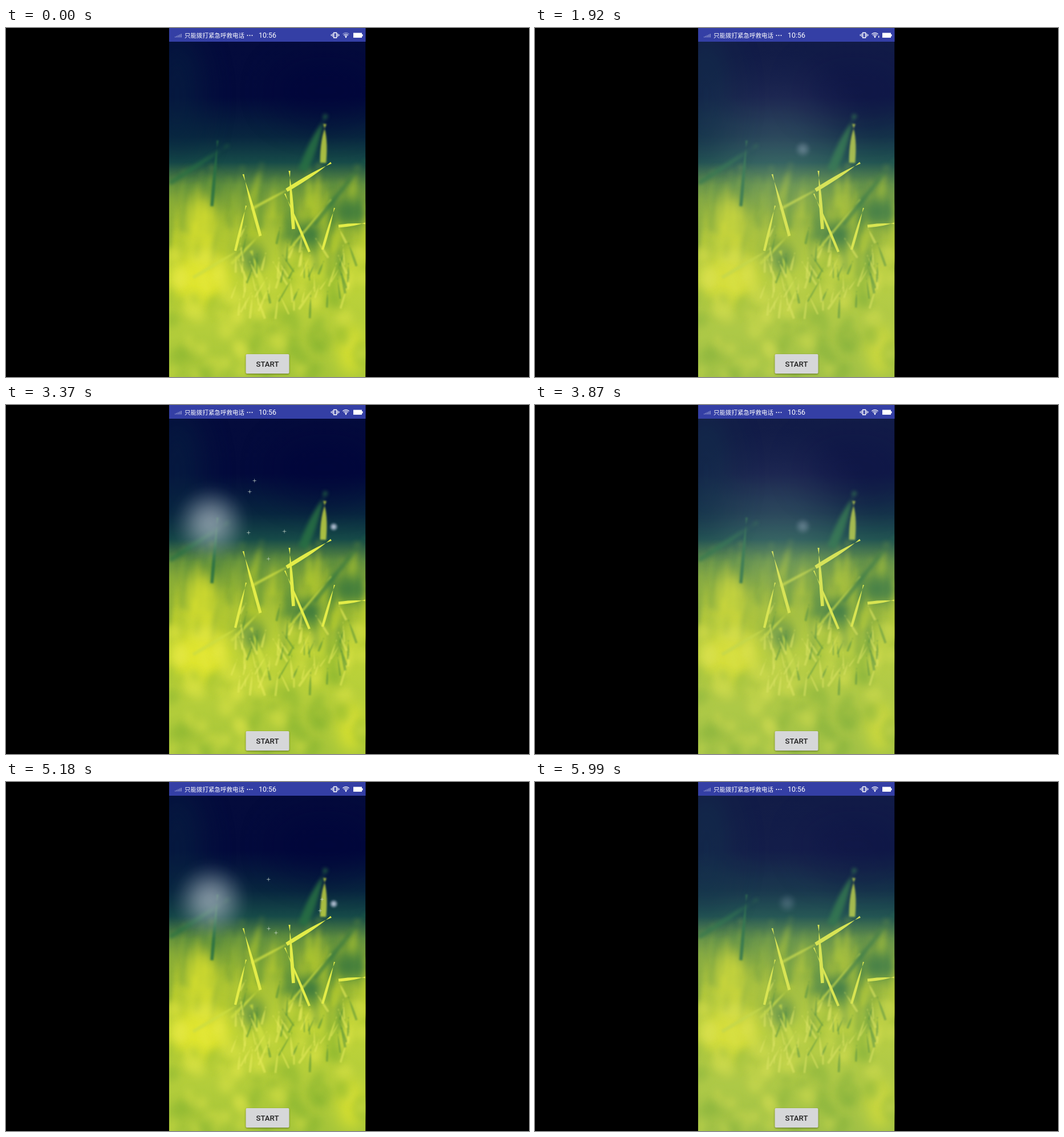
Recreate the animation shown at these times as an HTML page with a canvas. Size 917x611 px, loop 6.02 s.

```html
<!DOCTYPE html>
<html lang="zh">
<head>
<meta charset="utf-8">
<title>Lens flare over grass</title>
<style>
html, body { margin: 0; width: 100%; height: 100%; overflow: hidden; background: #000; }
canvas { display: block; width: 917px; height: 611px; }
</style>
</head>
<body>
<canvas id="stage" width="917" height="611"></canvas>
<script>
const W = 917, H = 611, LOOP = 6020, PLAY = 1430;
const LEFT = 286, RIGHT = 630.5, FLARE_Y = 212, CENTER_X = 458;
const PLAY_STARTS = [830, 2780, 4590];
const stage = document.getElementById('stage').getContext('2d');

const clamp = v => Math.min(1, Math.max(0, v));
const mix = (a, b, k) => a + (b - a) * k;

function seeded(seed) {
  let s = seed;
  const next = () => (s = (s * 16807) % 2147483647) / 2147483647;
  next();
  return (a = 0, b = 1) => mix(a, b, next());
}

function clipToPhone(ctx) {
  ctx.beginPath();
  ctx.rect(LEFT, 0, RIGHT - LEFT, H);
  ctx.clip();
}

// A tapered leaf from its tip (x, y) to its root (rx, ry)
function blade(ctx, color, x, y, rx, ry, width) {
  const length = Math.hypot(rx - x, ry - y);
  const nx = (y - ry) / length * width / 2, ny = (rx - x) / length * width / 2;
  const mx = mix(x, rx, 0.35), my = mix(y, ry, 0.35);
  ctx.fillStyle = color;
  ctx.beginPath();
  ctx.moveTo(x - nx * 0.4, y - ny * 0.4);
  ctx.quadraticCurveTo(mx + nx, my + ny, rx + nx * 0.7, ry + ny * 0.7);
  ctx.lineTo(rx - nx * 0.7, ry - ny * 0.7);
  ctx.quadraticCurveTo(mx - nx, my - ny, x + nx * 0.4, y + ny * 0.4);
  ctx.fill();
}

function blob(ctx, color, x, y, rx, ry = rx, angle = 0) {
  ctx.fillStyle = color;
  ctx.beginPath();
  ctx.ellipse(x, y, rx, ry, angle, 0, 7);
  ctx.fill();
}

function paintBackdrop(ctx) {
  const g = ctx.createLinearGradient(0, 0, 0, H);
  [[24, '#040b3c'], [120, '#030a3c'], [190, '#08263f'], [235, '#164a48'], [275, '#62903f'],
   [330, '#9fbb36'], [430, '#bed338'], [520, '#b5ce3b'], [611, '#a5c53a']]
    .forEach(([y, color]) => g.addColorStop(y / H, color));
  ctx.fillStyle = g;
  ctx.fillRect(LEFT, 0, RIGHT - LEFT, H);
  ctx.filter = 'blur(26px)';
  blob(ctx, 'rgba(8,40,66,.5)', 300, 120, 45, 110);
  blob(ctx, 'rgba(0,2,58,.5)', 560, 110, 95, 60);
}

function paintTufts(ctx, rnd) {
  ctx.filter = 'blur(5px)';
  for (let i = 0; i < 80; i++) {
    const x = rnd(LEFT, RIGHT), top = 232 + 22 * Math.cos(x / 31) ** 2 + rnd(0, 85), light = rnd();
    const color = `rgba(${mix(60, 205, light)},${mix(125, 218, light)},${mix(65, 45, light)},.55)`;
    blade(ctx, color, x, top, x + rnd(-22, 12), top + rnd(60, 120), rnd(9, 19));
  }
}

function paintDepth(ctx) {
  const shade = 'rgba(35,105,65,.75)', sun = 'rgba(233,234,45,.8)';
  ctx.filter = 'blur(11px)';
  blob(ctx, shade, 360, 292, 9, 30);
  blob(ctx, shade, 428, 402, 22, 23);
  blob(ctx, shade, 525, 362, 30, 22);
  blob(ctx, shade, 600, 322, 28, 26);
  ctx.filter = 'blur(15px)';
  blob(ctx, sun, 342, 345, 26, 55);
  blob(ctx, sun, 340, 440, 50, 45);
  blob(ctx, sun, 605, 565, 20, 45);
}

function paintForeground(ctx, rnd) {
  ctx.filter = 'blur(7px)';
  for (let i = 0; i < 85; i++) {
    const y = rnd(390, 615), sunny = rnd() > mix(0.2, 0.65, (y - 390) / 225);
    blob(ctx, sunny ? 'rgba(232,234,75,.38)' : 'rgba(120,172,45,.38)',
      rnd(LEFT, RIGHT), y, rnd(6, 15), rnd(9, 24), rnd(-0.7, 0.7));
  }
}

function paintBlades(ctx, rnd) {
  const dark = 'rgba(40,112,68,.85)', soft = 'rgba(206,222,65,.8)', lit = '#e3ec48';
  ctx.filter = 'blur(3px)';
  blade(ctx, dark, 561, 152, 520, 250, 22);
  blade(ctx, dark, 390, 205, 287, 272, 9);
  blade(ctx, dark, 631, 230, 540, 345, 7);
  ctx.filter = 'blur(1.4px)';
  blade(ctx, dark, 371, 197, 361, 312, 8);
  blade(ctx, soft, 559, 168, 556, 236, 15);
  blade(ctx, soft, 505, 277, 430, 317, 6);
  blade(ctx, soft, 415, 385, 328, 437, 8);
  blade(ctx, soft, 446, 361, 395, 413, 7);
  blade(ctx, soft, 570, 300, 495, 390, 5);
  blade(ctx, soft, 430, 390, 457, 474, 15);

  // Small leaves around the focal plane
  ctx.filter = 'blur(.9px)';
  for (let i = 0; i < 70; i++) {
    const x = rnd(395, 605), y = rnd(345, 475), length = rnd(18, 42), lean = rnd(-0.7, 0.7);
    blade(ctx, i % 3 ? 'rgba(228,234,90,.6)' : 'rgba(75,140,55,.5)',
      x, y, x + length * lean, y + length, rnd(3, 6));
  }
  ctx.filter = 'blur(.6px)';
  blade(ctx, lit, 570, 236, 492, 284, 9);
  blade(ctx, lit, 416, 256, 446, 364, 7);
  blade(ctx, lit, 497, 250, 504, 352, 8);
  blade(ctx, lit, 489, 290, 532, 392, 6);
  blade(ctx, lit, 421, 311, 402, 390, 6);
  blade(ctx, lit, 576, 315, 555, 388, 6);
  blade(ctx, lit, 630, 342, 583, 347, 7);
}

function paintMeadow() {
  const canvas = document.createElement('canvas');
  canvas.width = W;
  canvas.height = H;
  const ctx = canvas.getContext('2d'), rnd = seeded(4211);
  ctx.fillRect(0, 0, W, H);
  clipToPhone(ctx);
  paintBackdrop(ctx);
  paintTufts(ctx, rnd);
  paintDepth(ctx);
  paintForeground(ctx, rnd);
  paintBlades(ctx, rnd);
  return canvas;
}

function drawWifi(ctx, t) {
  ctx.strokeStyle = '#fff';
  ctx.lineWidth = 1.3;
  for (let i = 0; i < 3; i++) {
    ctx.globalAlpha = t < 330 && i === 2 ? 0.45 : 0.95;
    ctx.beginPath();
    ctx.arc(596, 16.5, 2.8 + i * 2.6, -Math.PI * 0.75, -Math.PI * 0.25);
    ctx.stroke();
  }
  ctx.globalAlpha = 1;
  blob(ctx, '#fff', 596, 16, 1.2);
  if (t >= 330 && t < 2260) ctx.fillRect(602, 13.5, 1.3, 3.5);
}

function drawStatusBar(ctx, t) {
  ctx.fillStyle = '#343fa5';
  ctx.fillRect(LEFT, 0, RIGHT - LEFT, 24);
  ctx.fillStyle = 'rgba(255,255,255,.42)';
  for (let i = 0; i < 5; i++) ctx.fillRect(296 + i * 2.6, 15 - i * 1.2, 1.5, 1.5 + i * 1.2);
  ctx.fillStyle = '#fff';
  ctx.font = '10.5px "Noto Sans CJK SC", "Noto Sans CJK", sans-serif';
  ctx.fillText('只能拨打紧急呼救电话', 313, 16.5);
  for (let i = 0; i < 3; i++) blob(ctx, '#fff', 423.5 + i * 4, 13, 1);
  ctx.font = '12.4px Roboto, sans-serif';
  ctx.fillText('10:56', 443, 17.3);

  // Vibrate icon
  ctx.strokeStyle = '#fff';
  ctx.lineWidth = 1.5;
  ctx.strokeRect(574.7, 8.3, 4.8, 8.8);
  for (const side of [-1, 1]) {
    ctx.fillRect(576.5 + side * 4.5, 9.5, 1.2, 6);
    ctx.fillRect(576.5 + side * 6.7, 11, 1.2, 3);
  }
  drawWifi(ctx, t);
  ctx.fillRect(609, 8.5, 15, 8.5);
  ctx.fillRect(624, 11, 1.6, 3.5);
}

function drawButton(ctx) {
  ctx.save();
  ctx.shadowColor = 'rgba(0,0,0,.4)';
  ctx.shadowBlur = 3;
  ctx.shadowOffsetY = 1;
  ctx.fillStyle = '#d6d7d9';
  ctx.beginPath();
  ctx.roundRect(420.5, 571, 76, 34, 2);
  ctx.fill();
  ctx.restore();
  ctx.fillStyle = '#202020';
  ctx.font = '500 13.2px Roboto, sans-serif';
  ctx.textAlign = 'center';
  ctx.fillText('START', 458.5, 593);
  ctx.textAlign = 'left';
}

function glow(ctx, x, y, r, alpha, color) {
  const g = ctx.createRadialGradient(x, y, 0, x, y, r);
  for (let k = 0; k <= 1; k += 0.125) {
    g.addColorStop(k, `rgba(${color},${alpha * (0.5 + 0.5 * Math.cos(Math.PI * k))})`);
  }
  ctx.fillStyle = g;
  ctx.fillRect(x - r, y - r, 2 * r, 2 * r);
}

function drawStar(ctx, x, y, alpha) {
  ctx.fillStyle = `rgba(205,218,205,${alpha})`;
  ctx.beginPath();
  for (let i = 0; i < 8; i++) {
    const r = i % 2 ? 1 : 4.2, a = i * Math.PI / 4;
    ctx.lineTo(x + r * Math.cos(a), y + r * Math.sin(a));
  }
  ctx.fill();
}

function drawStars(ctx, age, seed) {
  const rnd = seeded(seed), alpha = 0.65 * clamp((950 - age) / 350);
  for (let i = 0; i < 5; i++) {
    const angle = rnd(0, 2 * Math.PI), distance = rnd(25, 100) * age / 600;
    drawStar(ctx, CENTER_X + distance * Math.cos(angle), FLARE_Y + distance * Math.sin(angle), alpha);
  }
}

function drawFlare(ctx, age, seed) {
  const p = 0.5 - 0.5 * Math.cos(Math.PI * age / PLAY);
  ctx.save();
  clipToPhone(ctx);
  ctx.fillStyle = `rgba(130,160,165,${0.11 * clamp((age - 650) / 400)})`;
  ctx.fillRect(LEFT, 24, RIGHT - LEFT, H);
  glow(ctx, mix(309, 445, p), FLARE_Y - 5 * Math.sin(Math.PI * p), 5 + 215 * p ** 1.1,
    0.03 + 0.95 * (1 - p) ** 1.1, '192,202,212');
  glow(ctx, mix(651, 442, p), FLARE_Y + 2 * (1 - p), 8 + 12 * p * p,
    0.18 + 1.05 * (1 - p) ** 1.2 * clamp(age / 150), '205,214,235');
  drawStars(ctx, age, seed);
  ctx.restore();
}

const meadow = paintMeadow();

function render(now) {
  const t = now % LOOP;
  stage.drawImage(meadow, 0, 0);
  drawStatusBar(stage, t);
  const start = PLAY_STARTS.find(s => t >= s && t < s + PLAY);
  if (start !== undefined) drawFlare(stage, t - start, start);
  drawButton(stage);
}

const origin = performance.now();
function tick() {
  render(performance.now() - origin);
  requestAnimationFrame(tick);
}
tick();
</script>
</body>
</html>
```
